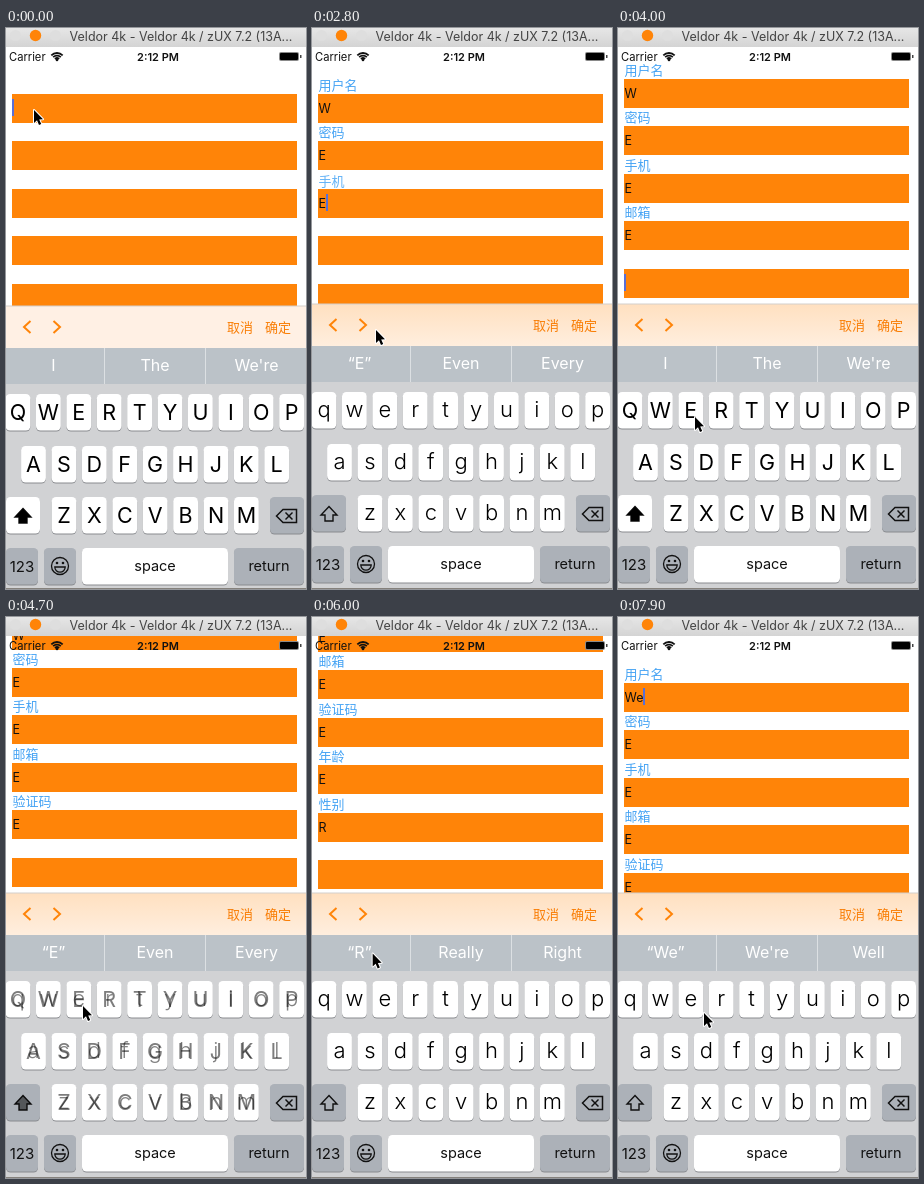
An HTML page with a canvas for the animation above (8 s loop, 300x561 px).

```html
<!DOCTYPE html>
<html lang="zh">
<head>
<meta charset="utf-8">
<style>
  html, body { margin: 0; width: 100%; height: 100%; overflow: hidden; background: #fff; }
  canvas { display: block; width: 300px; height: 561px; }
</style>
</head>
<body>
<canvas id="stage" width="300" height="561"></canvas>
<script>
const ctx = document.getElementById('stage').getContext('2d');
const LOOP = 8000, ORANGE = '#ff8408', DARK_KEY = '#acb1b8';
const SANS = 'Inter, "Noto Sans CJK SC", "Noto Sans CJK", sans-serif';
const CJK = '"Noto Sans CJK SC", "Noto Sans CJK", sans-serif';
const PITCH = 47.4, TOP = 66.5;
const labels = ['用户名', '密码', '手机', '邮箱', '验证码', '年龄', '性别', '省', '市'];
const hints = {
  '': ['I', 'The', "We're"],
  W: ['“W”', 'We', 'Was'],
  E: ['“E”', 'Even', 'Every'],
  R: ['“R”', 'Really', 'Right'],
  We: ['“We”', "We're", 'Well']
};

// Each visit to a field: field, time of focus, time of key press, key
const visits = [
  [0, -1000, 650, 'W'], [1, 1200, 1750, 'E'], [2, 2200, 2550, 'E'],
  [3, 2900, 3250, 'E'], [4, 3650, 4050, 'E'], [5, 4450, 4750, 'E'],
  [6, 5050, 5450, 'R'], [7, 5850, 6250, 'E'], [8, 6550, 6850, 'R'],
  [0, 7250, 7650, 'e']
].map(([field, focus, press, key]) => ({ field, focus, press, key, typed: press + 100 }));

const keyX = { W: 42, E: 77, e: 77, R: 89 };
const pointer = [
  [0, 28, 82], [200, 28, 82], [1500, 44, 331], [2800, 64, 302],
  [5300, 79, 384], [7900, 86, 396], [LOOP, 86, 396]
];
for (const v of visits) {
  if (v.focus > 0) pointer.push([v.focus, 49, 299]);
  pointer.push([v.press - 60, keyX[v.key], 389], [v.typed, keyX[v.key], 389]);
}
pointer.sort((a, b) => a[0] - b[0]);

const clamp = x => Math.max(0, Math.min(1, x));
const ramp = (t, start, span) => clamp((t - start) / span);
const smooth = x => x * x * (3 - 2 * x);
const mix = (a, b, k) => a + (b - a) * k;
const scrollFor = field => Math.max(0, field * PITCH + TOP - 241);

function rect(x, y, w, h, color) {
  ctx.fillStyle = color;
  ctx.fillRect(x, y, w, h);
}

function round(x, y, w, h, r, color) {
  ctx.fillStyle = color;
  ctx.beginPath();
  ctx.roundRect(x, y, w, h, r);
  ctx.fill();
}

function disc(x, y, r, color) {
  ctx.fillStyle = color;
  ctx.beginPath();
  ctx.arc(x, y, r, 0, 7);
  ctx.fill();
}

function arc(x, y, r, from, to, width, close) {
  ctx.strokeStyle = '#111';
  ctx.lineWidth = width;
  ctx.beginPath();
  ctx.arc(x, y, r, from, to);
  if (close) ctx.closePath();
  ctx.stroke();
}

function text(str, x, y, size, color, align = 'center', weight = 400, family = SANS) {
  ctx.font = `${weight} ${size}px ${family}`;
  ctx.textAlign = align;
  ctx.textBaseline = 'alphabetic';
  ctx.fillStyle = color;
  ctx.fillText(str, x, y);
}

function line(points, color, width, close) {
  ctx.strokeStyle = color;
  ctx.lineWidth = width;
  ctx.beginPath();
  points.forEach(([x, y]) => ctx.lineTo(x, y));
  if (close) ctx.closePath();
  ctx.stroke();
}

function valueOf(field, t) {
  return visits.filter(v => v.field === field && t >= v.typed).map(v => v.key).join('');
}

function drawForm(t, now, scroll) {
  ctx.save();
  ctx.beginPath();
  ctx.rect(0, 19, 300, 290);
  ctx.clip();
  labels.forEach((label, i) => {
    const y = Math.floor(TOP + i * PITCH - scroll + 0.01);
    rect(6, y, 285, 29, ORANGE);
    const value = valueOf(i, t);
    if (value) {
      const first = visits.find(v => v.field === i);
      const shown = smooth(ramp(t, first.typed, 200));
      ctx.globalAlpha = shown;
      text(label, 6.5, y - 4 + 8 * (1 - shown), 13, '#45a3f4', 'left', 400, CJK);
      ctx.globalAlpha = 1;
      text(value, 6.5, y + 18.5, 12.5, '#111', 'left');
    }
    if (i === now.field && (now.focus < 0 || t > now.focus + 260)) {
      ctx.font = `400 12.5px ${SANS}`;
      rect(Math.round(6 + ctx.measureText(value).width), y + 5, 2, 17, '#596fd6');
    }
  });
  ctx.restore();
}

function drawStatus() {
  const bar = ctx.createLinearGradient(0, 0, 0, 19);
  bar.addColorStop(0, '#e6e6e6');
  bar.addColorStop(1, '#d4d4d4');
  rect(0, 0, 300, 19, bar);
  disc(9.5, 7.5, 5.5, '#dedede');
  disc(29.5, 7.5, 5.7, ORANGE);
  disc(49.5, 7.5, 5.5, '#dedede');
  text('Veldor 4k - Veldor 4k / zUX 7.2 (13A...', 175, 13, 12.5, '#444');

  text('Carrier', 3, 33, 11.2, '#111', 'left');
  for (const r of [2.8, 5.4, 8]) arc(51, 33, r, -2.36, -0.78, 1.8);
  disc(51, 32, 1.3, '#111');
  text('2:12 PM', 152, 33, 11, '#111', 'center', 600);
  round(273, 24, 20, 9, 2, '#8a8a8a');
  round(274, 25, 18, 7, 1, '#000');
  rect(294, 27, 1.5, 3, '#444');
}

function keyCap(x, y, w, color = '#fff') {
  round(x, y + 1, w, 36.5, 4.5, '#898b8f');
  round(x, y, w, 36.5, 4.5, color);
}

function drawToolbar(t, now) {
  let fill = '#fff0e4';
  if (now.field === 8) fill = '#fff';
  else if (t > 300 && now.field !== 6) {
    fill = ctx.createLinearGradient(0, 276, 0, 318);
    fill.addColorStop(0, '#ffe0c0');
    fill.addColorStop(1, '#ffeede');
  }
  rect(0, 276, 300, 42, fill);
  rect(0, 275.5, 300, 1, '#d4cfcb');
  line([[24.5, 291], [18, 297], [24.5, 303]], ORANGE, 2);
  line([[47.5, 291], [54, 297], [47.5, 303]], ORANGE, 2);
  text('取消', 221, 302, 13, '#f97d04', 'left', 500, CJK);
  text('确定', 259, 302, 13, '#f97d04', 'left', 500, CJK);
}

function drawHints(t, now) {
  const i = visits.indexOf(now);
  let word = valueOf(now.field, t);
  if (t >= now.typed && t < now.typed + 80) word = word.slice(0, -1);
  if (i > 0 && t < now.focus + 280) word = visits[i - 1].key;
  rect(0, 318, 300, 36, '#bbc2c8');
  rect(98, 318, 1, 36, '#dce0e3');
  rect(199, 318, 1, 36, '#dce0e3');
  hints[word].forEach((h, n) => text(h, [47.5, 149, 250.5][n], 340.5, 16, '#fff'));
}

function drawArrow(upper) {
  const shape = [[17, 478.5], [25, 487], [21, 487], [21, 493], [13, 493], [13, 487], [9, 487]];
  line(shape, '#111', 1.4, true);
  ctx.globalAlpha = upper;
  ctx.fillStyle = '#000';
  ctx.fill();
  ctx.globalAlpha = 1;
}

function drawKeys(upper, pressed) {
  rect(0, 354, 300, 210, '#d1d2d4');
  let spot = null;
  ['QWERTYUIOP', 'ASDFGHJKL', 'ZXCVBNM'].forEach((row, r) => {
    [...row].forEach((ch, c) => {
      const x = [12, 27.5, 58][r] + c * 30.4, y = Math.round(364.4 + r * 51.35);
      keyCap(x - 12.4, y, 24.8);
      if (ch === pressed.toUpperCase()) {
        spot = x;
        return;
      }
      ctx.globalAlpha = upper;
      text(ch, x, y + 26, 21.5, '#000');
      ctx.globalAlpha = 1 - upper;
      text(ch.toLowerCase(), x, y + 24.5, 22, '#000', 'center', 300);
      ctx.globalAlpha = 1;
    });
  });

  keyCap(0, 467, 34, upper > 0.6 ? '#fff' : DARK_KEY);
  drawArrow(upper);
  keyCap(264, 467, 34, DARK_KEY);
  line([[270.5, 486], [277, 479.5], [290.5, 479.5], [290.5, 492.5], [277, 492.5]], '#111', 1.5, true);
  line([[279.5, 482.5], [286.5, 489.5]], '#111', 1.5);
  line([[286.5, 482.5], [279.5, 489.5]], '#111', 1.5);

  keyCap(0, 518, 32, DARK_KEY);
  text('123', 16, 542, 15, '#111');
  keyCap(38, 518, 32, DARK_KEY);
  arc(54, 536, 8.5, 0, 7, 1.3);
  disc(51, 533, 1.3, '#111');
  disc(57, 533, 1.3, '#111');
  arc(54, 537, 5.2, 0, Math.PI, 1.3, true);
  keyCap(76, 518, 146);
  text('space', 149, 541, 14.5, '#111');
  keyCap(228, 518, 70, DARK_KEY);
  text('return', 263, 541, 14.5, '#111');
  return spot;
}

function drawBubble(x, ch) {
  ctx.save();
  ctx.shadowColor = 'rgba(80, 95, 115, .55)';
  ctx.shadowBlur = 7;
  ctx.shadowOffsetY = 1;
  ctx.fillStyle = '#fdfdfd';
  ctx.beginPath();
  ctx.moveTo(x - 18, 305);
  ctx.lineTo(x + 18, 305);
  ctx.quadraticCurveTo(x + 25, 305, x + 25, 312);
  ctx.lineTo(x + 25, 345);
  ctx.bezierCurveTo(x + 25, 356, x + 12.5, 357, x + 12.5, 370);
  ctx.lineTo(x + 12.5, 397);
  ctx.quadraticCurveTo(x + 12.5, 401, x + 8, 401);
  ctx.lineTo(x - 8, 401);
  ctx.quadraticCurveTo(x - 12.5, 401, x - 12.5, 397);
  ctx.lineTo(x - 12.5, 370);
  ctx.bezierCurveTo(x - 12.5, 357, x - 25, 356, x - 25, 345);
  ctx.lineTo(x - 25, 312);
  ctx.quadraticCurveTo(x - 25, 305, x - 18, 305);
  ctx.fill();
  ctx.restore();
  text(ch, x, 344, 33, '#000');
}

function drawPointer(t) {
  const n = pointer.findIndex(p => p[0] > t);
  const a = pointer[n - 1], b = pointer[n];
  const k = smooth(ramp(t, a[0], b[0] - a[0]));
  ctx.save();
  ctx.translate(mix(a[1], b[1], k), mix(a[2], b[2], k));
  ctx.lineJoin = 'round';
  line([[0, 0], [0, 13], [3, 10.3], [5, 15], [7.2, 14], [5.2, 9.5], [9, 9.3]], '#fff', 2, true);
  ctx.fillStyle = '#000';
  ctx.fill();
  ctx.restore();
}

function draw(t) {
  const i = visits.findLastIndex(v => t >= v.focus);
  const now = visits[i], before = visits[Math.max(0, i - 1)];
  const ease = 1 - (1 - ramp(t, now.focus, 240)) ** 3;
  const scroll = mix(scrollFor(before.field), scrollFor(now.field), ease);
  const wasEmpty = now.key !== 'e';
  let upper = 0;
  if (wasEmpty) {
    upper = t < now.typed ? ramp(t, now.focus + 200, 100) : 1 - ramp(t, now.typed, 100);
  }
  const pressed = t >= now.press && t < now.press + 150 ? now.key : '';

  rect(0, 0, 300, 561, '#fff');
  drawForm(t, now, scroll);
  drawStatus();
  ctx.save();
  ctx.translate(0, 2 * (1 - ramp(t, 40, 100)));
  drawToolbar(t, now);
  drawHints(t, now);
  const spot = drawKeys(upper, pressed);
  if (spot !== null) drawBubble(spot, pressed);
  ctx.restore();
  rect(0, 560, 300, 1, '#85817c');
  drawPointer(t);
}

const start = performance.now();
function tick() {
  draw((performance.now() - start) % LOOP);
  requestAnimationFrame(tick);
}
tick();
</script>
</body>
</html>
```
